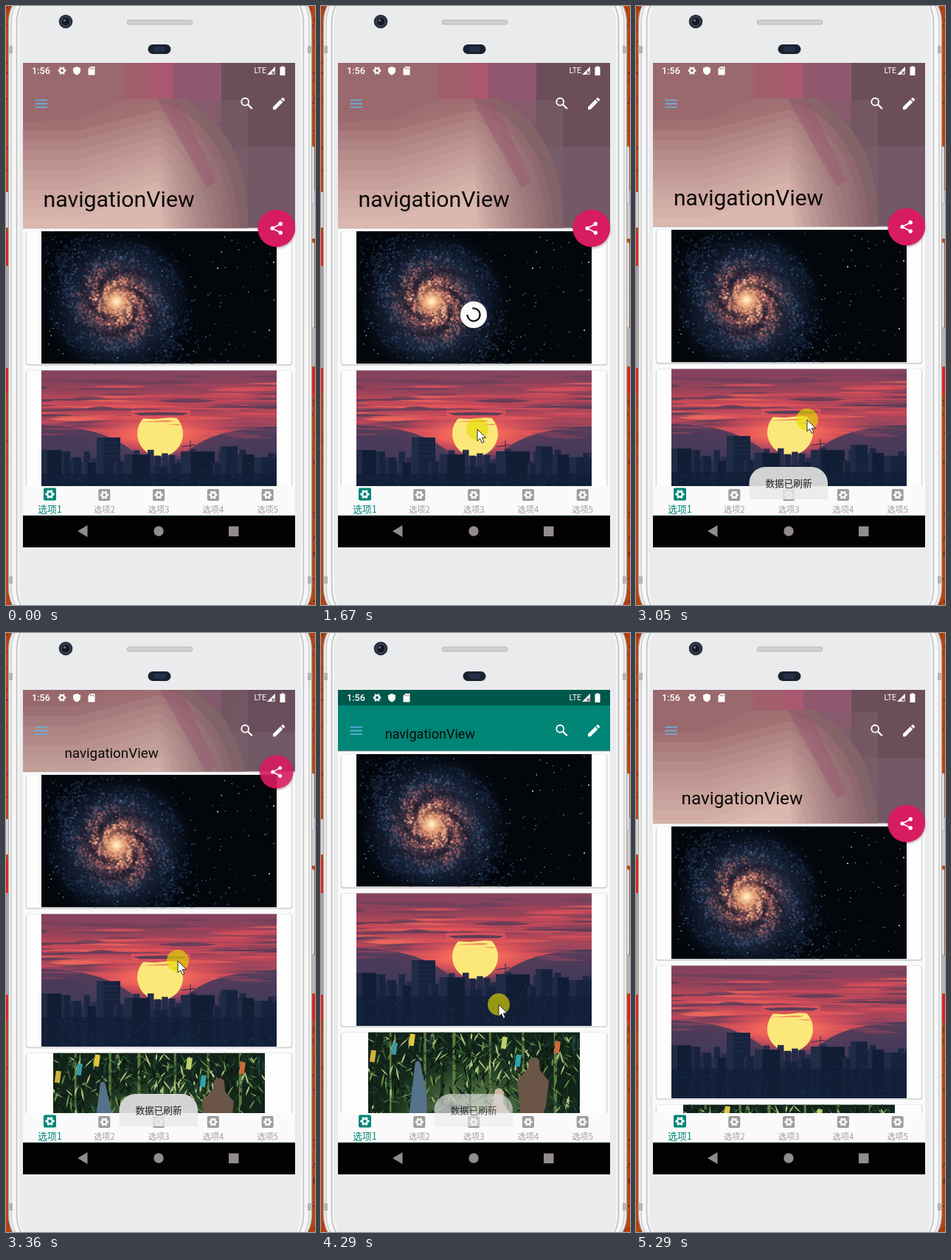
An HTML page that plays this animation: 419 by 811 pixels, repeating every 5.69 s.

```html
<!DOCTYPE html>
<html lang="zh">
<head>
<meta charset="utf-8">
<title>navigationView</title>
<style>
html,body{margin:0;width:100%;height:100%;overflow:hidden;background:#b9430f}
svg{display:block;width:419px;height:811px}
svg svg{width:auto;height:auto}
text{font-family:Roboto,sans-serif}
.cjk{font-family:"Noto Sans CJK SC","Noto Sans CJK",sans-serif;text-anchor:middle}
</style>
</head>
<body>
<svg id="stage" viewBox="0 0 419 811" xmlns="http://www.w3.org/2000/svg"></svg>
<script>
const LOOP = 5690;
let seed = 7;
const rnd = () => (seed = (seed * 16807) % 2147483647) / 2147483647;
const range = (a, b) => a + rnd() * (b - a);
const gauss = () => rnd() + rnd() + rnd() - 1.5;
const times = (n, fn) => Array.from({ length: n }, (_, i) => fn(i)).join('');
const clamp = v => Math.max(0, Math.min(1, v));
const f1 = v => v.toFixed(1);
const mix = (a, b, k) => `rgb(${a.map((v, i) => Math.round(v + (b[i] - v) * k))})`;
const rect = (x, y, w, h, fill, more = '') =>
  `<rect x="${x}" y="${y}" width="${w}" height="${h}" fill="${fill}" ${more}/>`;
const circle = (x, y, r, fill, more = '') => `<circle cx="${x}" cy="${y}" r="${r}" fill="${fill}" ${more}/>`;
const path = (d, fill, more = '') => `<path d="${d}" fill="${fill}" ${more}/>`;
const dot = (x, y, s) => `M${f1(x)} ${f1(y)}h${f1(s)}v${f1(s)}h-${f1(s)}z`;
const stops = list => list.map(([o, c, a = 1]) =>
  `<stop offset="${o}" stop-color="${c}" stop-opacity="${a}"/>`).join('');

const gear = (x, y, r, fill) => `<g transform="translate(${x} ${y}) scale(${r / 5})" fill="none" stroke="${fill}">
  <circle r="2.8" stroke-width="2"/>
  <circle r="4.1" stroke-width="1.8" pathLength="12" stroke-dasharray="1.1 .9" stroke-dashoffset=".55"/></g>`;

function galaxy() {
  const cols = ['#f8cf9f', '#e0967a', '#b06a62', '#8a5258', '#5d4856', '#3b4763', '#26395a', '#16243a'];
  const parts = cols.map(() => '');
  for (let i = 0; i < 2600; i++) {
    const k = Math.pow(rnd(), .8), r = 4 + k * 102;
    const a = Math.log(r) * 2.1 + (i % 4) * Math.PI / 2 + gauss() * .62;
    const u = Math.cos(a) * r, v = Math.sin(a) * r * .82;
    const x = 102 + u * .8 - v * .6, y = 95 + u * .6 + v * .8;
    if (x < 0 || y < 0 || y > 178) continue;
    const c = Math.min(7, Math.max(0, Math.floor(k * 9.5 + gauss() * 1.6)));
    parts[c] += dot(x, y, range(.8, 3.4));
  }
  let dust = '', gaps = '', stars = '';
  for (let i = 0; i < 420; i++) {
    const k = range(-90, 110);
    dust += dot(108 + k + gauss() * 55, 95 + k * .75 + gauss() * 55, range(1, 3));
  }
  for (let i = 0; i < 420; i++) {
    const r = range(22, 88), a = Math.log(r) * 2.1 + (i % 4 + .5) * Math.PI / 2 + gauss() * .25;
    const u = Math.cos(a) * r, v = Math.sin(a) * r * .82;
    gaps += dot(102 + u * .8 - v * .6, 95 + u * .6 + v * .8, range(1.5, 4));
  }
  for (let i = 0; i < 150; i++) stars += dot(range(2, 316), range(2, 176), range(.5, 1.4));
  return rect(0, 0, 319, 179.5, '#03060b') + rect(0, 0, 319, 179.5, 'url(#haze)') + path(dust, '#182a44') +
    parts.map((d, i) => path(d, cols[i], 'opacity=".85"')).reverse().join('') +
    path(gaps, '#141627', 'opacity=".6"') +
    circle(102, 95, 30, 'url(#core)') + path(stars, '#9fb3c4') +
    [[315, 42], [309, 134], [239, 50]].map(([x, y]) => circle(x, y, 1.1, '#c8d4dd')).join('');
}

function streak(x, y, w, h) {
  return `M${f1(x)} ${f1(y)}q${f1(w / 2)} ${f1(-h)} ${f1(w)} 0q${f1(-w / 2)} ${f1(h)} ${f1(-w)} 0`;
}

function sunset() {
  const tones = ['#6f3f5b', '#e2525a', '#523a57', '#c4485a', '#a5425a', '#f0685c'];
  const clouds = times(130, i => {
    const w = range(40, 190), low = i % 2;
    const y = low ? range(50, 92) : range(3, 55);
    return path(streak(range(-60, 300), y, w, range(1.5, 6)), tones[(i * 5 + (y < 18 ? 0 : i >> 1)) % (y < 18 ? 5 : 6)], 'opacity=".75"');
  });
  const far = times(34, i => rect(f1(i * 9.6), f1(range(106, 128)), 8.5, 70, i % 2 ? '#272c49' : '#1d2742'));
  const near = [[0, 27, 108], [27, 12, 110], [40, 14, 118], [58, 16, 125], [75, 32, 91], [98, 13, 124], [113, 34, 114],
    [147, 24, 130], [171, 18, 126], [189, 46, 110], [232, 12, 126], [243, 23, 103], [266, 22, 114], [289, 30, 118]];
  let lights = '';
  for (let i = 0; i < 240; i++) lights += dot(range(2, 315), range(118, 176), range(.8, 2));
  return rect(0, 0, 319, 179.5, 'url(#sky)') + clouds +
    `<ellipse cx="161" cy="86" rx="125" ry="34" fill="url(#glow)"/>` +
    circle(161, 86, 31, '#fce87a') +
    path('M122 54h80v9l-12 2-16-1-20 2-20-1-12 0z', '#d8525a') + path('M124 58q40-3 76 0l-8 3h-58z', '#5c3c57') +
    path('M132 70h40l8-1.5-10-1zM170 73h22l-8 1.500z', '#f08a60') +
    path('M0 180V74Q50 76 80 86T132 116V180ZM319 180V76Q268 78 238 88T192 116V180Z', '#40395a', 'opacity=".85"') +
    times(12, i => path(streak(i % 2 ? range(-20, 50) : range(215, 270), range(72, 100), range(30, 70), 3), '#8f4560', 'opacity=".6"')) +
    far + near.map(([x, w, y], i) => rect(x, y, w, 180 - y, i % 3 ? '#17233d' : '#111d34') +
      rect(x, y, w * .3, 180 - y, '#202b46')).join('') +
    rect(0, 140, 319, 39.5, '#111e37', 'opacity=".8"') + path('M202 110V95M190 103.5L208 101', 'none', 'stroke="#2a2b40"') +
    path(lights, '#24385a', 'opacity=".8"') + path('M77 98h28M77 104h28M77 110h28M77 116h28', 'none', 'stroke="#2a3150" stroke-width=".8"');
}

function bamboo() {
  const greens = ['#08120c', '#1a3d20', '#2f5f2c', '#0c1a14', '#6d9148', '#b2c382', '#1f463a', '#101c12'];
  const leaves = greens.map(() => '');
  for (let i = 0; i < 850; i++) {
    const x = range(-5, 290), side = Math.abs(x - 150) / 150;
    const y = Math.pow(rnd(), 1.2) * (95 + side * 75), a = range(.2, 2.9), l = range(5, 22);
    const dx = Math.cos(a) * l, dy = Math.sin(a) * l;
    leaves[i % 8] += `M${f1(x)} ${f1(y)}q${f1(dx / 2 + 2)} ${f1(dy / 2)} ${f1(dx)} ${f1(dy)}q${f1(-dx / 2 - 3)} ${f1(-dy / 2)} ${f1(-dx)} ${f1(-dy)}`;
  }
  let spots = '', shade = '';
  for (let i = 0; i < 220; i++) {
    const d = streak(range(0, 270), range(112, 178), range(4, 20), range(2, 7));
    if (i % 3) shade += d; else spots += d;
  }
  const stems = times(13, i => rect(f1(8 + i * 22 + range(-5, 5)), 0, f1(range(2, 4.5)), 122, i % 2 ? '#5d7d3f' : '#16301f'));
  const tags = [[57, 2, '#e2c63c'], [33, 14, '#3a9aa0'], [4, 24, '#d0b23c'], [201, 30, '#2fa3ad'], [254, 12, '#cf6a3a'], [182, 6, '#bfcf6a']];
  return rect(0, 0, 287, 179.5, '#12241a') + rect(0, 0, 287, 179.5, 'url(#clearing)') + stems +
    path('M0 113Q80 98 150 118T287 116V180H0Z', '#2d4225') +
    path('M55 180Q95 150 70 126Q130 106 180 128Q215 150 245 180Z', '#74834e') +
    path(spots, '#b9c085', 'opacity=".75"') + path(shade, '#182a18', 'opacity=".7"') +
    path('M90 106q18-16 45-5l4 12-46 1z', '#35463d') +
    leaves.map((d, i) => path(d, greens[i])).join('') +
    tags.map(([x, y, c]) => rect(x, y, 7, 16, c, `transform="rotate(8 ${x} ${y})"`)).join('') +
    path('M64 40q7-3 8 8l7 32 1 44-11 6-15-4 5-46z', '#56728a') +
    path('M172 78q8-6 12 4l-1 14 10 14-6 22-7 12 4 30h-8l-4-25-9 22-7-3 11-34-6-21 8-16z', '#cdb79c') +
    path('M218 38q8-8 14 0l1 14 12 14-4 34-8 20 5 48-9 5-10-34-14 26-10-5 11-54-4-40 15-18z', '#6a5546');
}

const night = () => rect(0, 0, 244, 179.5, '#08244c') + rect(0, 70, 244, 109.5, '#0d376a', 'opacity=".5"') +
  rect(121.6, 0, 1, 60, '#dce6ee');

const card = (i, x, art, w) => `<g transform="translate(0 ${f1(305 + i * 188.2)})">
  <rect x="27.5" y="1" width="360" height="180" rx="3" fill="none" stroke="#d4d4d4" stroke-width="1.800"/>
  <rect x="28" y="0" width="359" height="180" rx="3" fill="#fdfdfd" stroke="#e6e6e6" stroke-width=".6"/>
  <g class="art" transform="translate(${x} 0)" clip-path="url(#crop${w})">${art}</g></g>`;

function header() {
  const bands = times(11, i => {
    const y = 156 + i * 13.2, p = 129 + i * 12, x = 316 - i * 9.5;
    return path(`M23 ${f1(y)}H95L207 ${f1(p)}L${f1(240 - i * 3)} ${f1(p + 14)}Q${x - 6} ${f1(p + 60)} ${x} 301H23Z`,
      mix([160, 112, 115], [218, 184, 175], Math.pow(i / 10, .8)));
  });
  return rect(23, 77, 369, 226, '#735965') + rect(23, 77, 136, 90, '#9a696d') + rect(159, 77, 39, 70, '#a15f6b') +
    rect(198, 77, 29, 60, '#aa5870') + rect(227, 77, 65, 80, '#8f586f') + rect(292, 77, 100, 114, '#6c4e5b') +
    path('M23 156L95 154L159 126H240Q330 170 328 301H23Z', '#8b6668') + path('M23 156L95 154L159 126H207V301H23Z', '#a06e72') + bands +
    rect(207, 128, 121, 174, 'url(#dusk)') +
    path('M207 129L236 130L285 238L272 246Z', '#97596f', 'opacity=".5"');
}

const tab = (i, label) => {
  const on = !i, x = 59.5 + i * 73.8, y = on ? 661 : 662, c = on ? '#008577' : '#a09c9d', s = on ? 17 : 16;
  return rect(x - s / 2, y - s / 2, s, s, c, 'rx="2"') + gear(x, y, s * .36, '#fafafa') +
    `<text class="cjk" x="${x}" y="${on ? 685.5 : 686}" font-size="${on ? 12.8 : 11.2}" fill="${c}">${label}</text>`;
};

const share = `<g stroke="#fff" stroke-width="1.8" fill="#fff"><path d="M6 -6L-6 0L6 6" fill="none"/>
  <circle cx="5.4" cy="-6" r="1.9"/><circle cx="-5.6" cy="0" r="1.9"/><circle cx="5.4" cy="6" r="1.9"/></g>`;

const phone = () => {
  const edge = (x, w, c, sw, fill = 'none') =>
    `<rect x="${x}" y="-28" width="${w}" height="866" rx="50" fill="${fill}" stroke="${c}" stroke-width="${sw}"/>`;
  let grain = '';
  for (let i = 0; i < 260; i++) grain += dot(rnd() < .5 ? range(0, 10) : range(408, 418), range(0, 811), range(1, 2.5));
  return rect(0, 0, 419, 811, '#b9430f') + path(grain, '#7c2c0a') +
    [[0, 252, 48, '#d8d5d5'], [0, 308, 44, '#e02018'], [0, 352, 138, '#aaa5a5'], [0, 490, 34, '#e02018'],
     [414, 250, 65, '#cfcaca'], [414, 436, 52, '#b9b2b2'], [414, 490, 36, '#e02018']]
      .map(([x, y, h, c]) => rect(x, y, 5, h, c)).join('') +
    [[190, 78], [320, 116]].map(([y, h]) => rect(413, y, 5, h, '#e4e4e5', 'rx="2" stroke="#9b9b9d" stroke-width=".7"')).join('') +
    edge(3.5, 411, '#aaa8a9', 1.4, '#f7f7f7') + edge(7, 404, '#d3d3d4', 2) + edge(14.5, 389, '#c2c2c4', 1.6, '#e9ebed') +
    edge(17, 384, '#f4f5f6', 2) +
    [54, 772].map(y => rect(3, y, 6, 10, '#b5b5b7') + rect(409, y, 6, 10, '#b5b5b7')).join('') +
    circle(81, 21, 9.3, '#2b2f3b') + circle(81, 21, 6, '#151924', 'stroke="#525a6c"') + circle(79.5, 19.5, 1.8, '#56688c') +
    rect(164, 19, 89, 6, '#cfcfd0', 'rx="3" stroke="#b2b2b4" stroke-width=".8"') +
    rect(192.5, 52, 31, 13, '#1a2130', 'rx="6.5"') + rect(200, 55, 16, 7, '#25314a', 'rx="3.5"');
};

const statusBar = `<g fill="#fff"><text x="35" y="92" font-size="12.6" font-weight="500">1:56</text>
  ${gear(76, 87.5, 5.3, '#fff')}
  <path d="M96 82l5 2v3.5q0 4-5 6q-5-2-5-6V84zM114.500 82h6v11.500h-9V85z"/>
  <path d="M114.500 83.500v2M116.500 83.500v2M118.500 83.500v2" stroke="#8a6468"/>
  <text x="336.500" y="91.300" font-size="10.600">LTE</text>
  <path d="M365 82V93H354z"/><path d="M360.500 88.500l4 4m0-4l-4 4" stroke="#775562" stroke-width="1.200"/>
  <path d="M373.500 81.500h3v1h2v11.500h-7V82.500h2z"/></g>`;

const tools = `<path d="M39.500 127.500h16.500M39.500 132.300h16.500M39.500 137h16.500" stroke="#65b7e8" stroke-width="1.700"/>
  <g fill="none" stroke="#fff" stroke-width="1.900"><circle cx="324.200" cy="129.700" r="4.900"/><path d="M327.800 133.300l6 6" stroke-width="2.300"/></g>
  <path transform="translate(359.300 121.300) scale(.9)" fill="#fff" d="M3 17.250V21h3.750L17.810 9.940l-3.750-3.750zM20.700 7q.8-.7 0-1.400l-2.300-2.300q-.7-.8-1.400 0l-1.900 1.800 3.800 3.800z"/>`;

const $ = id => document.getElementById(id);
$('stage').innerHTML = `<defs>
  <radialGradient id="haze" gradientUnits="userSpaceOnUse" cx="105" cy="98" r="105">${stops([[0, '#8c5250'], [.3, '#46323f'], [.58, '#182338'], [1, '#081324', 0]])}</radialGradient>
  <radialGradient id="core">${stops([[0, '#fff6dc'], [.16, '#fbd09a'], [.45, '#dc8a68', .6], [1, '#a8605c', 0]])}</radialGradient>
  <linearGradient id="sky" x2="0" y2="1">${stops([[0, '#84435f'], [.14, '#8f425a'], [.25, '#c84a58'], [.36, '#a5455a'], [.5, '#a84a5c'], [.65, '#573f5f'], [1, '#263050']])}</linearGradient>
  <radialGradient id="glow">${stops([[0, '#ff8650'], [.4, '#f2605a', .9], [.7, '#d84c58', .6], [1, '#b04458', 0]])}</radialGradient>
  <radialGradient id="clearing" cy=".6">${stops([[0, '#8ea466'], [.6, '#31552d', .7], [1, '#12241a', 0]])}</radialGradient>
  <linearGradient id="dusk">${stops([[0, '#7a6069', 0], [.5, '#7a6069', .35], [1, '#7a6069', .6]])}</linearGradient>
  <clipPath id="listClip"><rect id="listBox" x="23" width="369"/></clipPath>
  <clipPath id="barClip"><rect id="barBox" x="23" y="77" width="369"/></clipPath>
  ${[319, 287, 244].map(w => `<clipPath id="crop${w}"><rect width="${w}" height="179.5"/></clipPath>`).join('')}
  <filter id="soft" x="-30%" y="-30%" width="160%" height="160%"><feDropShadow dx="0" dy="2" stdDeviation="1.8" flood-opacity=".3"/></filter>
</defs>
${phone()}${rect(23, 77, 369, 656, '#fafafa')}
<g clip-path="url(#listClip)"><g id="list">
  ${card(0, 48, galaxy(), 319)}${card(1, 48, sunset(), 319)}${card(2, 64, bamboo(), 287)}${card(3, 85, night(), 244)}</g>
  <g id="spinner"><circle r="18" fill="#fafafa" filter="url(#soft)"/>
  <circle id="arc" r="8.6" fill="none" stroke="#111" stroke-width="2.3" pathLength="100" stroke-dasharray="78 22"/></g></g>
<rect id="edge" x="23" width="369" height="1.500" fill="#000" opacity=".1"/>
<g clip-path="url(#barClip)"><g id="photo">${header()}</g>
  <g id="scrim">${rect(23, 77, 369, 226, '#008577')}${rect(23, 77, 369, 21, '#00574b')}</g></g>
<text id="title" fill="#0b0909">navigationView</text>
${statusBar}${tools}
<g id="fab"><circle r="25.3" fill="#d81b60" filter="url(#soft)"/>${share}</g>
${rect(23, 650, 369, 40, '#fafafa')}${times(5, i => tab(i, '选项' + (i + 1)))}
${rect(23, 689, 369, 1, '#b9d9d2')}${rect(23, 690, 369, 43, '#020202')}
<g fill="#928c8e"><path d="M97 711l13.500-8v16z"/><circle cx="207" cy="711" r="6.700"/><rect x="302" y="704.500" width="13.500" height="13.500"/></g>
<g id="toast"><path d="M153.500 650V646a22 22 0 0 1 22-22h62.500a22 22 0 0 1 22 22v4z" fill="#d9dadb" opacity=".96"/>
  ${rect(153.5, 650, 106.5, 18, '#e9e9e9', 'opacity=".82"')}
  <text class="cjk" x="207" y="650.600" font-size="12.600" fill="#222">数据已刷新</text></g>
<g id="cursor"><circle id="touch" r="15" fill="#e4dc00" opacity=".64"/>
  <path d="M0 0V16L3.700 12.700L6.300 18.600L8.900 17.500L6.400 11.700H11.500Z" fill="#fff" stroke="#111" stroke-width=".9"/></g>`;

// The picture advances in short steps: [first, last, count].
const ticks = [0];
[[70, 360, 5], [510, 1050, 8], [1130, 1670, 8], [1820, 2360, 8], [2440, 2970, 8], [3050, 3590, 8],
 [3670, 4210, 8], [4290, 4830, 8], [4910, 5290, 6]].forEach(([a, b, n]) => {
  for (let i = 0; i < n; i++) ticks.push(Math.floor((a + (b - a) * i / (n - 1)) / 10) * 10);
});

const pointer = [[70, 301, 686], [140, 270, 590], [220, 234, 470], [290, 220, 428], [360, 235, 441], [510, 232, 432],
  [890, 198, 321], [970, 184, 312], [1050, 186, 365], [1130, 186, 375], [1670, 212, 573], [1820, 215, 580],
  [2280, 227, 600], [2600, 229, 590], [2970, 231, 562], [3050, 232, 560], [3360, 233, 440], [3670, 234, 340], [3830, 235, 312],
  [3900, 235, 318], [4290, 241, 503], [4450, 245, 560], [4830, 255, 610], [5210, 375, 777]];
const scroll = [[2970, 0], [3050, 2], [3210, 42], [3360, 118], [3520, 195], [3670, 249], [3820, 284], [3900, 290],
  [4050, 245], [4290, 141], [4450, 99], [4700, 63], [5000, 47], [5200, 43]];
const pull = [[1440, 380], [1670, 418], [1820, 400], [2000, 340]];

function at(keys, t, k = 1) {
  const i = keys.findIndex(p => p[0] > t);
  if (i < 0) return keys[keys.length - 1][k];
  if (!i) return keys[0][k];
  const a = keys[i - 1], b = keys[i];
  return a[k] + (b[k] - a[k]) * (t - a[0]) / (b[0] - a[0]);
}
const ramp = (t, from, len) => clamp((t - from) / len);
const set = (id, attrs) => { for (const k in attrs) $(id).setAttribute(k, attrs[k]); };
const show = (id, on) => set(id, { display: on ? 'inline' : 'none' });
const arts = document.querySelectorAll('.art');

let last = -1;
function draw(now) {
  let t = 0;
  for (const k of ticks) if (k <= now) t = k;
  if (t === last) return;
  last = t;

  const s = at(scroll, t), bar = Math.min(s, 152), bottom = 300.5 - bar, c = bar / 152;
  set('list', { transform: `translate(0 ${-s})` });
  set('listBox', { y: bottom, height: 650 - bottom });
  set('barBox', { height: bottom - 77 });
  set('edge', { y: bottom });
  set('photo', { transform: `translate(0 ${-bar / 2})` });
  set('scrim', { opacity: Math.pow(ramp(t, 3330, 600), 1.25) - ramp(t, 4430, 600) });
  set('title', {
    x: 50.5 + 39 * c, y: 271.5 - 138 * c,
    'font-size': 18 + 12.3 * (1 - c) * (1 - c), 'font-weight': c === 1 ? 500 : 400
  });
  const size = 1 - ramp(t, 3330, 200) + ramp(t, 4430, 200);
  set('fab', { transform: `translate(366.8 ${bottom + .5}) scale(${size})`, opacity: size });

  const blank = t >= 2200 && t < 2360;
  arts.forEach(a => a.setAttribute('display', blank ? 'none' : 'inline'));
  show('spinner', t >= 1440 && t < 2440);
  set('spinner', { transform: `translate(207 ${at(pull, t)}) scale(${1 - .9 * ramp(t, 2285, 70)})` });
  set('arc', { transform: `rotate(${-95 + (t - 2280) * .6})` });
  set('toast', { opacity: ramp(t, 2400, 200) - ramp(t, 4210, 280) });

  show('cursor', t >= 70 && t < 5280);
  set('cursor', { transform: `translate(${at(pointer, t)} ${at(pointer, t, 2)})` });
  show('touch', (t >= 1100 && t < 1740) || (t >= 2960 && t < 3840) || (t >= 3900 && t < 4500));
}

const start = performance.now();
function frame() {
  draw((performance.now() - start) % LOOP);
  requestAnimationFrame(frame);
}
frame();
</script>
</body>
</html>
```
